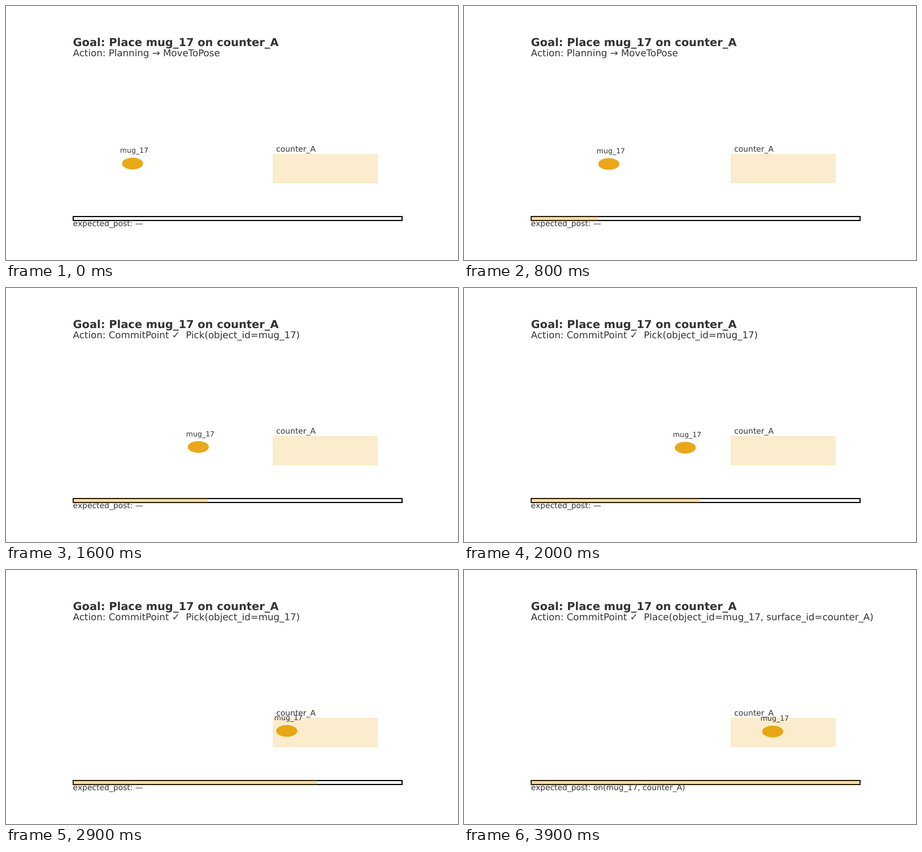
These frames come from a looping animation (800 by 450 pixels, 4 s). An HTML page:

```html
<!DOCTYPE html>
<html lang="en">
<head>
<meta charset="utf-8">
<title>Place mug_17</title>
<style>
html, body { margin: 0; width: 100%; height: 100%; overflow: hidden; background: #fff; }
svg { display: block; width: 800px; height: 450px; }
text {
  font-family: "DejaVu Sans", sans-serif;
  fill: #333;
  white-space: pre;
  text-rendering: geometricPrecision;
}
</style>
</head>
<body>
<svg viewBox="0 0 800 450">
  <rect x="472" y="262" width="186" height="52" fill="#e69f00" fill-opacity=".2"/>
  <ellipse id="mug" rx="18.6" ry="10.4" fill="#e69f00" fill-opacity=".9"/>
  <rect x="119" y="373" width="582" height="7" fill="none" stroke="#000" stroke-width="2"/>
  <rect id="bar" x="119" y="373" height="7" fill="#e69f00" fill-opacity=".35"/>
  <text x="118.6" y="71" font-size="19.44" font-weight="bold">Goal: Place mug_17 on counter_A</text>
  <text id="action" x="118.6" y="89" font-size="16.67"></text>
  <text x="478.2" y="258" font-size="13.89">counter_A</text>
  <text id="label" font-size="12.5">mug_17</text>
  <text id="post" x="118.6" y="390" font-size="13.89"></text>
</svg>
<script>
const LOOP = 4000, STEP = 100, LAST = LOOP / STEP - 1;
const $ = id => document.getElementById(id);
const mug = $('mug'), bar = $('bar'), label = $('label'), action = $('action'), post = $('post');

// Axes fractions to stage pixels
const px = x => 100 + 620 * x;
const py = y => 400.5 - 346.5 * y;

function set(el, attrs) {
  for (const k in attrs) el.setAttribute(k, attrs[k]);
}

function setText(el, s) {
  if (el.textContent !== s) el.textContent = s;
}

function actionAt(p) {
  if (p < 0.35) return 'Planning → MoveToPose';
  if (p < 0.85) return 'CommitPoint ✓  Pick(object_id=mug_17)';
  return 'CommitPoint ✓  Place(object_id=mug_17, surface_id=counter_A)';
}

function draw(ms) {
  const p = Math.floor((ms % LOOP) / STEP) / LAST;
  const ease = (1 - Math.cos(Math.PI * p)) / 2;
  const x = 0.2 + 0.52 * ease, y = 0.35 - 0.02 * ease;

  set(mug, { cx: px(x), cy: py(y) });
  // Label sits on whole pixels
  set(label, { x: Math.round(px(x - 0.035) + 1.13) - 1.13, y: Math.round(py(y + 0.055)) });
  set(bar, { width: Math.round(px(0.03 + 0.94 * p)) - 119 });
  setText(action, 'Action: ' + actionAt(p));
  setText(post, 'expected_post: ' + (p < 0.85 ? '—' : 'on(mug_17, counter_A)'));
}

let start;
function tick(now) {
  start ??= now;
  draw(Math.max(0, now - start));
  requestAnimationFrame(tick);
}
draw(0);
requestAnimationFrame(tick);
</script>
</body>
</html>
```
